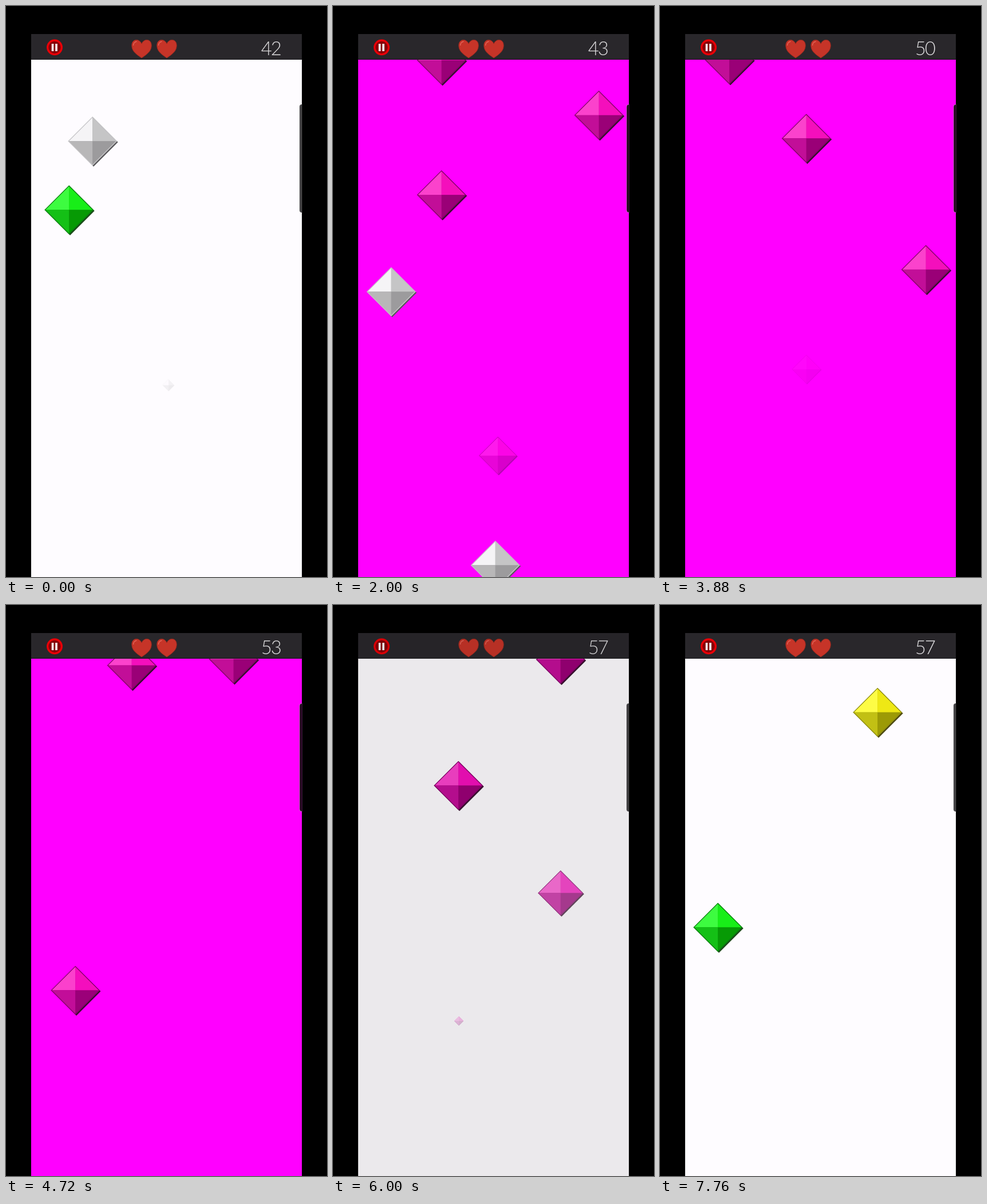
Animation of 561x998 px, one loop 7.8 s. Source, as an HTML page with a canvas:

```html
<!DOCTYPE html>
<html lang="en">
<head>
<meta charset="utf-8">
<title>Falling gems</title>
<style>
  html, body { margin: 0; width: 100%; height: 100%; overflow: hidden; background: #000; }
  canvas { display: block; }
</style>
</head>
<body>
<canvas id="stage" width="561" height="998"></canvas>
<script>
const ctx = document.getElementById('stage').getContext('2d');
const LOOP = 7800, TOP = 94, FALL = 1100, POP_MS = 200;
const LEFT = 43.7, WIDTH = 473.6;
const SLOW = 0.0012, FAST = 0.0019;
const PINK_FROM = 920, PINK_TO = 5920;

// Facets: top left, top right, bottom left, bottom right, then outline and shadow.
const COLORS = {
  silver: ['#f5f4f6', '#c5c5c6', '#b8b7b8', '#9c9b9d', '#c6c5c8', '#59585b'],
  green: ['#3dfc40', '#18ee18', '#14c016', '#079a05', '#0b7f10', '#1c4a1a'],
  red: ['#fa3b45', '#f20f1c', '#c20f13', '#9c0004', '#760a0e', '#3c1010'],
  pink: ['#fb42cc', '#f40fbc', '#c20e98', '#9a0077', '#85056a', '#36102e'],
  yellow: ['#fdfc45', '#eee815', '#c2c014', '#9c9a06', '#8f8c10', '#4a4710']
};

const phase = y => Math.acos(1 - 2 * (y - TOP) / FALL);

// A gem passes (x, y) at time t; pop is when it is tapped.
function gem(color, x, y, t, rate, pop = Infinity) {
  return { color, x, rate, pop, start: t - phase(y) / rate };
}
const pink = (x, y, t, pop, rate = FAST) => gem('pink', x, y, t, rate, pop);

const gems = [
  gem('silver', 284, 662, 0, SLOW, -150),
  gem('green', 110.5, 356, 0, SLOW, 560),
  gem('silver', 151.5, 236, 0, 0.00119),
  gem('red', 340, 487.5, 880, 0.0015),
  gem('silver', 284, 292.5, 880, SLOW),
  gem('silver', 102, 499, 2000, SLOW),
  pink(288.5, 785, 2000, 1956),
  pink(190, 329.5, 2000, 2330),
  pink(465, 190.5, 2000, 2520),
  pink(190, 95, 2000, 2800),
  pink(332, TOP, 2260, 3100),
  pink(122, TOP, 2530, 3330),
  pink(398, TOP, 2800, 3560),
  pink(256, 634, 3880, 3800),
  pink(465, 460, 3880, 4100),
  pink(256, 231, 3880, 4350),
  pink(121.5, 94.2, 3880, 4720),
  pink(220, 770, 5560, 5380),
  pink(398, 690, 5560, 5440),
  pink(220, 329, 5560, 5840, 0.001726),
  pink(398, 156, 5560, 5986, 0.00189),
  pink(219.5, 315, 6000),
  pink(398, 95.5, 6000),
  gem('green', 101.5, 563, 7760, SLOW),
  gem('yellow', 380.5, 187.5, 7760, SLOW)
];

function poly(c, fill, ...pts) {
  c.beginPath();
  for (let i = 0; i < pts.length; i += 2) c.lineTo(pts[i], pts[i + 1]);
  c.closePath();
  c.fillStyle = fill;
  c.fill();
}

function rect(fill, x, y, w, h) {
  ctx.fillStyle = fill;
  ctx.fillRect(x, y, w, h);
}

const diamond = (c, fill, r, d) => poly(c, fill, d, d - r, d + r, d, d, d + r, d - r, d);

// Each colour is painted once, so that a fading gem fades as a whole.
const SPRITE = 96;
function paintSprite([tl, tr, bl, br, line, shadow]) {
  const canvas = document.createElement('canvas');
  canvas.width = canvas.height = SPRITE * 2;
  const c = canvas.getContext('2d');
  c.scale(2, 2);
  c.translate(SPRITE / 2, SPRITE / 2);
  const r = 41;
  diamond(c, shadow, 42.7, 1.5);
  diamond(c, line, 43, -0.3);
  c.translate(-0.4, -0.4);
  diamond(c, br, r, 0);
  poly(c, tl, 0, 0, 0, -r, -r, 0);
  poly(c, tr, 0, 0, 0, -r, r, 0);
  poly(c, bl, 0, 0, 0, r, -r, 0);
  return canvas;
}
const sprites = {};
for (const name in COLORS) sprites[name] = paintSprite(COLORS[name]);

function drawGem(g, t) {
  const angle = (t - g.start) * g.rate;
  if (angle < 0 || angle > Math.PI) return;
  const scale = t < g.pop ? 1 : 1 - (t - g.pop) / POP_MS;
  if (scale <= 0) return;
  const y = TOP + FALL * (1 - Math.cos(angle)) / 2;
  const size = SPRITE * scale;
  ctx.globalAlpha = Math.min(1, 0.04 + 0.96 * ((scale - 0.45) / 0.55) ** 2);
  ctx.drawImage(sprites[g.color], g.x - size / 2, y - size / 2, size, size);
  ctx.globalAlpha = 1;
}

function drawHeart(x) {
  ctx.save();
  ctx.translate(x, 75);
  ctx.beginPath();
  ctx.moveTo(0, -9);
  ctx.bezierCurveTo(4, -19, 18, -18, 17.2, -5);
  ctx.bezierCurveTo(17, 5, 7, 11, 0, 15.8);
  ctx.bezierCurveTo(-7, 11, -17, 5, -17.2, -5);
  ctx.bezierCurveTo(-18, -18, -4, -19, 0, -9);
  ctx.closePath();
  ctx.fillStyle = '#c63428';
  ctx.fill();
  ctx.strokeStyle = '#96291f';
  ctx.lineWidth = 1;
  ctx.stroke();
  ctx.beginPath();
  ctx.arc(-7.5, -6, 7, Math.PI, Math.PI * 1.45);
  ctx.strokeStyle = '#ea6d60';
  ctx.lineWidth = 1.3;
  ctx.stroke();
  ctx.restore();
}

function drawPause() {
  ctx.beginPath();
  ctx.arc(85, 72.3, 12.3, 0, Math.PI * 2);
  ctx.fillStyle = '#850006';
  ctx.fill();
  ctx.strokeStyle = '#e90007';
  ctx.lineWidth = 3.4;
  ctx.stroke();
  rect('#fff', 79.7, 66, 3.6, 13);
  rect('#fff', 86.2, 66, 3.6, 13);
}

function drawHeader(t) {
  rect('#29272b', LEFT, 49, WIDTH, 44.6);
  rect('#171619', LEFT, 92.5, WIDTH, 1.1);
  drawPause();
  drawHeart(237);
  drawHeart(281);
  const taps = gems.filter(g => g.color === 'pink' && g.pop <= t).length;
  ctx.font = '300 33px Lato, "Open Sans", sans-serif';
  ctx.letterSpacing = '-2px';
  ctx.textAlign = 'right';
  ctx.fillStyle = '#dcdbdd';
  ctx.fillText(42 + taps, 480, 86);
}

function drawHandle(onPink) {
  ctx.beginPath();
  ctx.roundRect(513, 172, 4.5, 189, [4, 0, 0, 4]);
  ctx.fillStyle = onPink ? '#24051f' : '#464547';
  ctx.fill();
  if (!onPink) return;
  ctx.strokeStyle = '#d98ad6';
  ctx.lineWidth = 0.7;
  ctx.stroke();
}

const ramp = (t, from, to) => Math.max(0, Math.min(1, (t - from) / (to - from)));

function draw(t) {
  const onPink = t >= PINK_FROM && t < PINK_TO;
  rect('#000', 0, 0, 561, 998);
  ctx.save();
  ctx.beginPath();
  ctx.rect(LEFT, 49, WIDTH, 949);
  ctx.clip();
  rect(onPink ? '#f0f' : '#fefcff', LEFT, 93, WIDTH, 905);
  gems.forEach(g => drawGem(g, t));
  drawHandle(onPink);
  drawHeader(t);
  const dim = 0.075 * (ramp(t, 5380, 5520) - ramp(t, 6040, 6240));
  if (dim > 0) rect(`rgba(0,0,0,${dim})`, LEFT, 49, WIDTH, 949);
  ctx.restore();
}

const origin = performance.now();
function tick() {
  draw((performance.now() - origin) % LOOP);
  requestAnimationFrame(tick);
}
tick();
</script>
</body>
</html>
```
